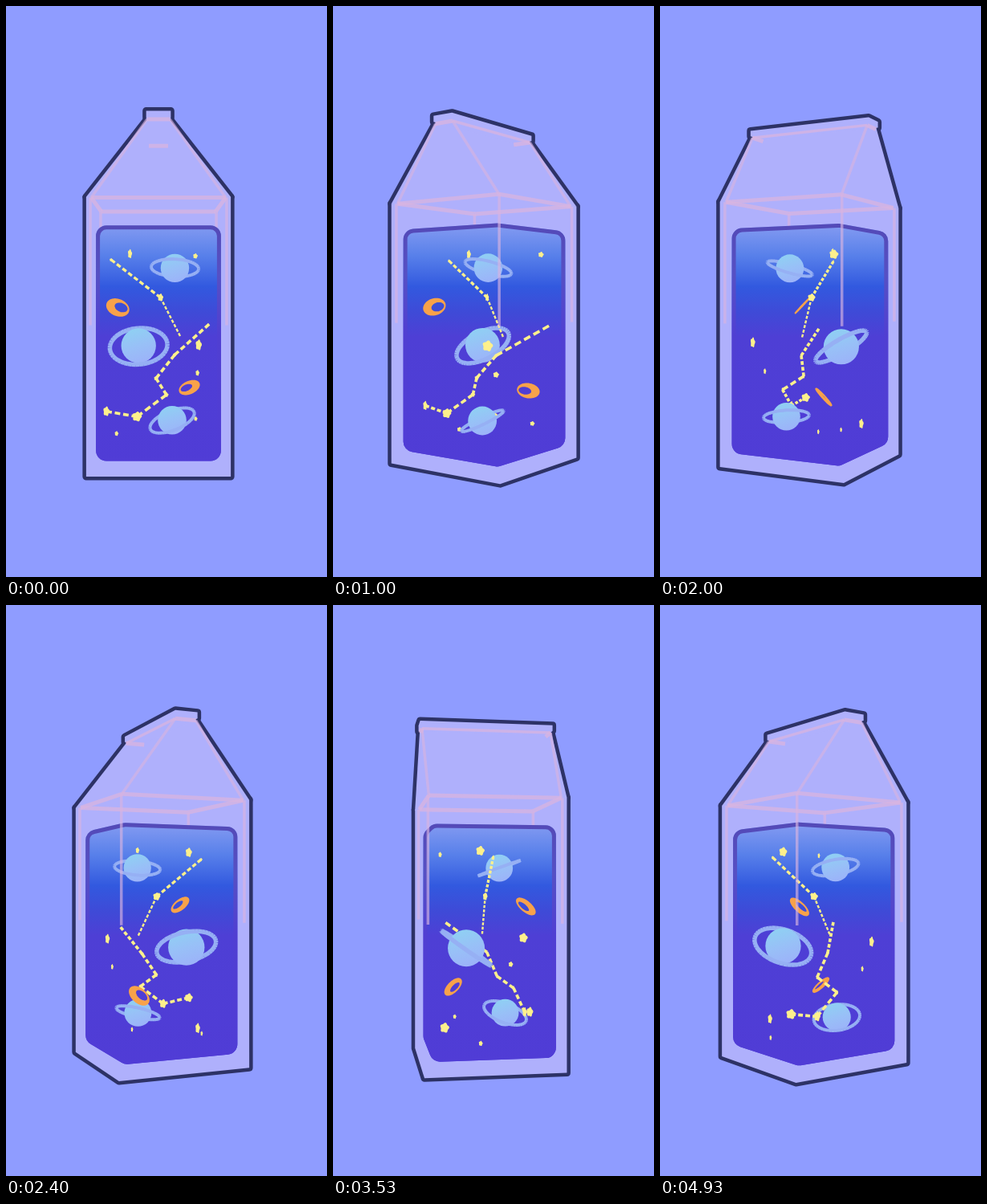
An HTML page with a canvas for the animation above (5000 ms loop, 400 px wide and 711 px high).

```html
<!DOCTYPE html>
<html lang="en">
<head>
<meta charset="utf-8">
<title>Space carton</title>
<style>
html, body { margin: 0; height: 100%; overflow: hidden; background: #8f9cff; }
canvas { display: block; }
</style>
</head>
<body>
<canvas id="stage" width="400" height="711"></canvas>
<script>
const ctx = document.getElementById('stage').getContext('2d');
const LOOP = 5000, FPS = 15, DEPTH = 950, CX = 190, CY = 355, RAD = Math.PI / 180;
const PINK = '#d9b4e0', YELLOW = '#fdf08c', ORANGE = '#f8a24a', INK = '#2d3266';

// Turn of the carton: [seconds, degrees]
const TURN = [[0, 0], [.53, 14.5], [1, 37.1], [2, 117.8], [2.4, 157], [3, 214.5], [4, 293.3], [4.4, 311], [4.93, 323.9]];

const slope = i => (TURN[i + 1][1] - TURN[i][1]) / (TURN[i + 1][0] - TURN[i][0]);
function tangent(i) {
  if (i === 0) return 22;
  if (i === TURN.length - 1) return slope(i - 1);
  const a = TURN[i][0] - TURN[i - 1][0], b = TURN[i + 1][0] - TURN[i][0];
  return (slope(i - 1) * b + slope(i) * a) / (a + b);
}
function turnAt(sec) {
  let i = 0;
  while (i < TURN.length - 2 && sec > TURN[i + 1][0]) i++;
  const [t0, p0] = TURN[i], [t1, p1] = TURN[i + 1], d = t1 - t0;
  const u = Math.min(1, (sec - t0) / d), v = 1 - u;
  return p0 * (1 + 2 * u) * v * v + p1 * u * u * (3 - 2 * u)
    + d * (tangent(i) * u * v * v - tangent(i + 1) * u * u * v);
}

let turn, cosT, sinT;
function project([x, y, z]) {
  const depth = z * cosT + x * sinT, s = DEPTH / (DEPTH - depth);
  return { x: CX + (x * cosT - z * sinT) * s, y: CY + y * s, z: depth, s };
}

// Corners of a horizontal rectangle, in order around it
const rect = (w, d, y) => [[-w, y, d], [w, y, d], [w, y, -d], [-w, y, -d]];

function hull(points) {
  const p = points.map(project).sort((a, b) => a.x - b.x || a.y - b.y);
  const half = list => {
    const h = [];
    for (const c of list) {
      while (h.length > 1) {
        const a = h[h.length - 2], b = h[h.length - 1];
        if ((b.x - a.x) * (c.y - a.y) - (b.y - a.y) * (c.x - a.x) > 0) break;
        h.pop();
      }
      h.push(c);
    }
    return h.slice(0, -1);
  };
  return [...half(p), ...half(p.slice().reverse())];
}

function trace(p, closed) {
  ctx.beginPath();
  p.forEach(q => ctx.lineTo(q.x, q.y));
  if (closed) ctx.closePath();
}

function line(a, b, width, color, alpha = 1) {
  ctx.globalAlpha = alpha;
  ctx.strokeStyle = color;
  ctx.lineWidth = width;
  trace([a, b]);
  ctx.stroke();
  ctx.globalAlpha = 1;
}

function roundTrace(p, r) {
  const n = p.length;
  ctx.beginPath();
  ctx.moveTo((p[0].x + p[n - 1].x) / 2, (p[0].y + p[n - 1].y) / 2);
  p.forEach((q, i) => ctx.arcTo(q.x, q.y, p[(i + 1) % n].x, p[(i + 1) % n].y, r));
  ctx.closePath();
}

// Circle in a plane leaning by `lean` towards azimuth `dir`; shift moves it along the plane
function circle([cx, cy, cz], r, lean, dir, shift = 0) {
  const ca = Math.cos(lean * RAD), sa = Math.sin(lean * RAD);
  const cd = Math.cos(dir * RAD), sd = Math.sin(dir * RAD);
  return Array.from({ length: 49 }, (_, i) => {
    const u = shift + r * Math.cos(i * Math.PI / 24), v = r * Math.sin(i * Math.PI / 24);
    return project([cx + u * cd + v * ca * sd, cy + v * sa, cz - u * sd + v * ca * cd]);
  });
}

function planet(at, r, ringR, ringW, lean, dir) {
  const c = project(at), R = r * c.s, ring = circle(at, ringR, lean, dir);
  const half = front => {
    ctx.beginPath();
    for (let i = 1; i < ring.length; i++) {
      const a = ring[i - 1], b = ring[i];
      if ((a.z + b.z > 2 * c.z) !== front) continue;
      ctx.moveTo(a.x, a.y);
      ctx.lineTo(b.x, b.y);
    }
    ctx.strokeStyle = '#96b0f4';
    ctx.lineWidth = ringW;
    ctx.stroke();
  };
  const g = ctx.createLinearGradient(c.x - R * .3, c.y - R, c.x + R * .3, c.y + R);
  g.addColorStop(0, '#8fd0f3');
  g.addColorStop(.5, '#98c0f7');
  g.addColorStop(1, '#9cb2f9');
  return { z: c.z, draw() {
    half(false);
    ctx.fillStyle = g;
    ctx.beginPath();
    ctx.arc(c.x, c.y, R, 0, 7);
    ctx.fill();
    half(true);
  } };
}

function crescent(at, lean, dir) {
  return { z: project(at).z, draw() {
    ctx.beginPath();
    for (const p of [circle(at, 13.3, lean, dir), circle(at, 9, lean, dir, 4.3)]) {
      p.forEach((q, i) => i ? ctx.lineTo(q.x, q.y) : ctx.moveTo(q.x, q.y));
      ctx.closePath();
    }
    ctx.fillStyle = ORANGE;
    ctx.fill('evenodd');
    ctx.strokeStyle = ORANGE;
    ctx.lineWidth = 2;
    ctx.stroke();
  } };
}

function star(at, r, dir) {
  const c = project(at), wide = Math.max(.45, Math.abs(Math.cos((dir - turn) * RAD)));
  return { z: c.z, draw() {
    ctx.beginPath();
    for (let a = 0; a < 6.28; a += .15) {
      const q = r * c.s * (.89 + .11 * Math.cos(5 * a));
      ctx.lineTo(c.x + q * Math.sin(a + .2) * wide, c.y - q * Math.cos(a + .2));
    }
    ctx.fillStyle = YELLOW;
    ctx.fill();
  } };
}

// A fixed number of dashes, so they shorten with the segment
function dashes(a, b, count, width) {
  const p = project(a), q = project(b);
  return { z: (p.z + q.z) / 2, draw() {
    const step = Math.hypot(q.x - p.x, q.y - p.y) / (count - .35);
    ctx.setLineDash([step * .65, step * .35]);
    line(p, q, width, YELLOW);
    ctx.setLineDash([]);
  } };
}

const UPPER = [[-59, -39, 0], [2.5, 8, 0], [27, 56, 0]];
const LOWER = [[66, 43, -43], [20, 79, 5], [-3, 107, 14], [9.5, 124, 37.5], [-25.5, 149, 44.5], [-62, 143, 43]];
const LOWER_COUNT = [6, 4, 3, 4, 4];
const STARS = [
  [UPPER[0], 2, 0], [UPPER[1], 5, 135],
  [LOWER[1], 2.3, 0], [LOWER[2], 2.8, 20], [LOWER[3], 2.8, 20], [LOWER[4], 6, 15], [LOWER[5], 6, 130],
  [[-36, -47, -12], 6, 110], [[48.5, -46, -52], 3.6, 30], [[47, 63, 58], 6.5, 55],
  [[46.5, 97.5, 41], 3.6, 50], [[48, 164.5, -33], 3, 40], [[-53, 180, -14], 3.2, 40], [[-28, 165, -54], 6.3, 55]
];

function contents() {
  return [
    planet([20, -28, 21], 17.3, 29, 4, 20, 171),
    planet([-25.5, 70, -27.5], 22.3, 37, 5.5, 35, -6),
    planet([16.5, 156, 28], 17.3, 28.5, 4, 25, -53),
    crescent([-48.5, 19.5, 41], 47, 25),
    crescent([40, 124.7, -36], 47, 205),
    dashes(UPPER[0], UPPER[1], 9, 3.3),
    dashes(UPPER[1], UPPER[2], 9, 2.4),
    ...LOWER_COUNT.map((n, i) => dashes(LOWER[i], LOWER[i + 1], n, 3.6)),
    ...STARS.map(s => star(...s))
  ].sort((a, b) => a.z - b.z);
}

function shell() {
  const parts = [
    [...rect(82.3, 82.3, -107), ...rect(82.3, 82.3, 211)],
    [...rect(82.3, 82.3, -107), ...rect(12, 81, -197)],
    [...rect(14, 82.3, -205), ...rect(14, 82.3, -198)]
  ].map(hull);
  ctx.strokeStyle = INK;
  ctx.lineWidth = 9;
  for (const p of parts) { trace(p, true); ctx.stroke(); }
  ctx.fillStyle = '#afb0fc';
  for (const p of parts) { trace(p, true); ctx.fill(); }
}

function folds() {
  const eave = rect(77, 77, -107).map(project), fin = rect(13, 80, -196).map(project);
  eave.forEach((p, i) => {
    const next = (i + 1) % 4, along = i % 2 === 1;
    line(p, eave[next], 5, PINK, .75);
    // The long fold shows on the near side only
    if (!along || fin[i].z + fin[next].z > 6) line(fin[i], fin[next], along ? 3.5 : 5, PINK, .75);
    if (p.z > -30) line(p, fin[i], 3.5, PINK, .6);
  });
}

function uprights(front) {
  for (const [x, y, z] of rect(78, 78, -107)) {
    const top = project([x, y, z]);
    if ((top.z > 20) === front) line(top, project([x, 39, z]), 3.5, PINK, .65);
  }
}

function liquid() {
  const path = hull([...rect(72, 72, -75.5), ...rect(72, 72, 195.5)]);
  const shade = (...stops) => {
    const g = ctx.createLinearGradient(0, 275, 0, 573);
    stops.forEach(([at, color]) => g.addColorStop(at, color));
    return g;
  };
  ctx.save();
  roundTrace(path, 13);
  ctx.fillStyle = shade([0, '#8199f1'], [.12, '#5880ea'], [.25, '#3259df'], [.36, '#3f4ad7'], [.46, '#4e3fd5'], [1, '#503cd6']);
  ctx.fill();
  ctx.clip();
  ctx.strokeStyle = shade([0, '#544ab8'], [.2, '#5650c4'], [.45, '#503fd2'], [1, '#503cd6']);
  ctx.lineWidth = 10;
  ctx.stroke();
  ctx.restore();
}

function draw(now) {
  const ms = now % LOOP;
  turn = turnAt(Math.floor((ms + 5) * FPS / 1000) / FPS);
  cosT = Math.cos(turn * RAD);
  sinT = Math.sin(turn * RAD);
  ctx.fillStyle = '#8f9cff';
  ctx.fillRect(0, 0, 400, 711);
  ctx.lineJoin = 'round';
  shell();
  folds();
  uprights(false);
  liquid();
  contents().forEach(item => item.draw());
  uprights(true);
}

const start = performance.now();
function tick() {
  draw(performance.now() - start);
  requestAnimationFrame(tick);
}
tick();
</script>
</body>
</html>
```
